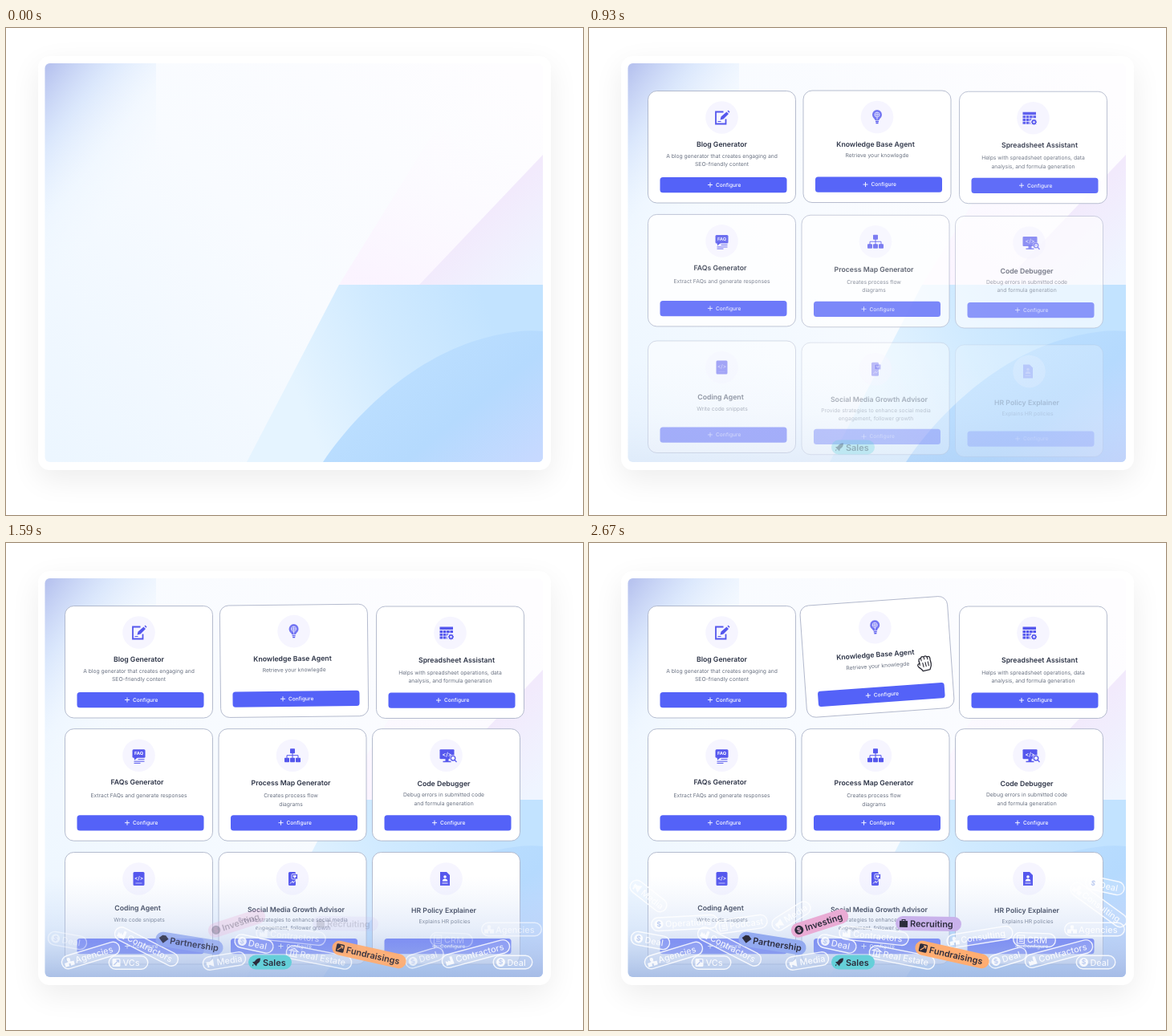
Animation of 719 by 607 pixels, one loop 2.7 s. Source, as an HTML page with a canvas:

```html
<!DOCTYPE html>
<html lang="en">
<head>
<meta charset="utf-8">
<style>
  html, body { margin: 0; width: 100%; height: 100%; overflow: hidden; background: #fff; }
  canvas { display: block; width: 719px; height: 607px; }
</style>
</head>
<body>
<canvas id="stage" width="719" height="607"></canvas>
<script>
const ctx = document.getElementById('stage').getContext('2d');
ctx.textRendering = 'geometricPrecision';
const LOOP = 2700, ACCENT = '#5462f8', ICON = '#5557ed';

const clamp = v => Math.max(0, Math.min(1, v));
const progress = (t, start, length) => clamp((t - start) / length);
const easeOut = u => 1 - (1 - u) ** 1.6;
const smooth = u => (1 - Math.cos(Math.PI * u)) / 2;

function box(x, y, w, h, r, fill, stroke, width = 1) {
  ctx.beginPath();
  ctx.roundRect(x, y, w, h, r);
  if (fill) { ctx.fillStyle = fill; ctx.fill(); }
  if (stroke) { ctx.strokeStyle = stroke; ctx.lineWidth = width; ctx.stroke(); }
}
function disc(x, y, r, fill) {
  ctx.beginPath();
  ctx.arc(x, y, r, 0, 7);
  ctx.fillStyle = fill;
  ctx.fill();
}
function text(s, x, y, size, weight, color, align = 'center') {
  ctx.font = `${weight} ${size}px Inter, sans-serif`;
  ctx.textAlign = align;
  ctx.fillStyle = color;
  ctx.fillText(s, x, y + size * 0.35);
}
function fillPath(d, color) {
  ctx.fillStyle = color;
  ctx.fill(new Path2D(d), 'evenodd');
}
function strokePath(d, color, width = 1) {
  ctx.strokeStyle = color;
  ctx.lineWidth = width;
  ctx.stroke(new Path2D(d));
}
function gradient(x0, y0, x1, y1, ...colors) {
  const g = ctx.createLinearGradient(x0, y0, x1, y1);
  colors.forEach((c, i) => g.addColorStop(i / (colors.length - 1), c));
  return g;
}
function at(x, y, degrees, draw) {
  ctx.save();
  ctx.translate(x, y);
  ctx.rotate(degrees * Math.PI / 180);
  draw();
  ctx.restore();
}

const cardIcons = {
  edit() {
    strokePath('M2,-7H-7.5V8H5V2', ICON, 1.8);
    fillPath('M-2,3L-1,-1L6,-7L8.5,-4.5L2,2ZM7,-8L8,-9L10,-7L9,-5.8Z', ICON);
    strokePath('M-5,5H-1', ICON, 1);
  },
  bulb() {
    fillPath('M-2.5,4C-2.5,2-6,1-6,-3A6,6 0 0 1 6,-3C6,1 2.5,2 2.5,4Z', '#7476f2');
    strokePath('M-2,5.5H2M-1.5,7.5H1.5', ICON, 1.4);
    strokePath('M-3,-3A3,3 0 1 1 3,-3A3,3 0 1 1-3,-3M0,-6V3M-3,-3H3', '#f3f2ff', 0.8);
  },
  table() {
    at(-4.5, 0, 0, () => {
      fillPath('M-8.5,-7.5H8V-4H-8.5Z', ICON);
      for (let i = 0; i < 11; i++) box(-8.5 + i % 4 * 4.3, -3 + (i >> 2) * 3.7, 3.6, 3, 0, ICON);
      disc(5.5, 5, 5, '#f6f5ff');
      strokePath('M5.5,1.5V8.5M2,5H9M3,2.5L8,7.5M8,2.5L3,7.5', ICON, 1.4);
      disc(5.5, 5, 2.7, ICON);
      disc(5.5, 5, 1.3, '#f6f5ff');
    });
  },
  faq() {
    box(-8, -7.5, 16, 10.5, 1.5, ICON);
    fillPath('M-6,2H-1L-5.5,6Z', ICON);
    text('FAQ', 0, -2.2, 5.6, 700, '#fff');
    strokePath('M-1,5H7M-6,7.5H7M-6,9.7H2', ICON, 1);
  },
  tree() {
    box(-3, -8.5, 6, 6, 0.8, ICON);
    strokePath('M0,-3V4M-7,4V0H7V4', ICON, 1);
    for (const x of [-7, 0, 7]) box(x - 3, 3, 6, 5.5, 0.8, ICON);
  },
  monitor() {
    at(2, 0, 0, () => {
      box(-10, -7.5, 18, 12, 1, ICON);
      fillPath('M-3,4H1V7H4V8.5H-6V7H-3Z', ICON);
      text('</>', -1, -1.5, 7, 600, '#fff');
      disc(6.5, 3.5, 4, '#f6f5ff');
      strokePath('M3.7,3.5A2.8,2.8 0 1 1 9.3,3.5A2.8,2.8 0 1 1 3.7,3.5M8.5,5.5L11,8.5', ICON, 1.3);
    });
  },
  code() {
    box(-7, -8.5, 14, 17, 1.5, ICON);
    text('</>', 0, -1, 6.5, 600, '#fff');
    strokePath('M-4,5.5H4', '#b9baff', 1);
  },
  phone() {
    box(-5, -8.5, 9, 17, 1.5, ICON);
    box(-1, -6, 7.5, 6.5, 1, ICON, '#f6f5ff', 0.8);
    fillPath('M2.7,-0.8L0.6,-3A1.2,1.2 0 0 1 2.7,-4A1.2,1.2 0 0 1 4.8,-3Z', '#fff');
    strokePath('M-3,6L0,3L1,5L5,1', '#fff', 1);
  },
  profile() {
    fillPath('M-6,-8.5H2L6,-4.5V8.5H-6Z', ICON);
    disc(0, -2.5, 1.8, '#fff');
    fillPath('M-3.3,3C-3.3,-1 3.3,-1 3.3,3Z', '#fff');
    strokePath('M-3.5,5.5H3.5', '#fff', 0.9);
  }
};

// x, y, icon, [title, dx, y], [first line y, dx, lines]
const cards = [
  [73.5, 78.5, 'edit', ['Blog Generator', 0, 66], [81, 0, 'A blog generator that creates engaging and', 'SEO-friendly content']],
  [267, 78, 'bulb', ['Knowledge Base Agent', -2, 67], [81, 0, 'Retrieve your knowlegde']],
  [461.5, 79, 'table', ['Spreadsheet Assistant', 8, 67], [82.5, 0, 'Helps with spreadsheet operations, data', 'analysis, and formula generation']],
  [73.5, 231.7, 'faq', ['FAQs Generator', -2, 66.5], [83, 0, 'Extract FAQs and generate responses']],
  [265, 231.7, 'tree', ['Process Map Generator', -2, 67.5], [83, -2, 'Creates process flow', 'diagrams']],
  [456.5, 231.7, 'monitor', ['Code Debugger', -3, 68], [82, -3, 'Debug errors in submitted code', 'and formula generation']],
  [73.5, 385.5, 'code', ['Coding Agent', -1.5, 69.5], [84.5, 0.5, 'Write code snippets']],
  [265, 385.5, 'phone', ['Social Media Growth Advisor', 4.5, 71], [84, 0.5, 'Provide strategies to enhance social media', 'engagement, follower growth']],
  [456.5, 385.5, 'profile', ['HR Policy Explainer', -3, 72.5], [86, -2, 'Explains HR policies']]
];

function drawCard([x, y, icon, [title, titleDx, titleY], [lineY, lineDx, ...lines]], i, t) {
  const u = progress(t, 110 + 88 * i, 800);
  if (!u) return;
  const tilt = i === 1 ? smooth(progress(t, 1500, 390)) - 0.16 * smooth(progress(t, 1890, 390)) : 0;
  const drop = 14 * (1 - u) ** 2.5 - 7 * tilt;
  ctx.globalAlpha = easeOut(u);
  at(x + 92, y + 70 + drop, -4.8 * tilt, () => {
    ctx.translate(0, -70);
    box(-92, 0, 184, 139.5, 11, '#fff', '#a3abc2', 0.8);
    disc(0, 33, 20.3, '#f6f5ff');
    at(icon === 'profile' ? -1.5 : 0, 33, 0, cardIcons[icon]);
    text(title, titleDx, titleY, 8.7, 600, '#2b3245');
    lines.forEach((line, n) => text(line, lineDx, lineY + n * 10.6, 6.75, 400, '#687080'));
    box(-77, 107.5, 158, 19.3, 3.5, ACCENT);
    strokePath('M-17.5,117H-11.5M-14.5,114V120', '#fff', 0.9);
    text('Configure', -7.5, 117, 6.6, 500, '#fff', 'left');
  });
  ctx.globalAlpha = 1;
}

const pillIcons = {
  coin(c, hole) { disc(0, 0, 5.5, c); text('$', 0, 0, 8.5, 700, hole); },
  rocket(c) { fillPath('M5,-5C1,-5-1,-3-2,-1L-5,0L-3,2L-2,3L0,5L1,2C3,1 5,-1 5,-5ZM-3,3L-5,5L-5,3Z', c); },
  bag(c) { fillPath('M-5,-3H-2.5V-5H2.5V-3H5V5H-5ZM-1.3,-3H1.3V-4H-1.3Z', c); },
  gem(c) { fillPath('M-6,-1L-2,-5H2L6,-1L0,5Z', c); },
  chart(c, hole) { box(-5, -5, 10, 10, 1.5, c); strokePath('M-3,3L3,-3M0,-3H3V0', hole, 1.3); },
  people(c) { disc(0, -3, 2.3, c); fillPath('M-6,5V0H-2V-1H2V0H6V5H1V2H-1V5Z', c); },
  factory(c) { fillPath('M-5,5V-1L-2,1V-1L1,1V-5H4L5,5Z', c); },
  bank(c) { strokePath('M-5,-2L0,-5L5,-2ZM-3.5,-1V4M0,-1V4M3.5,-1V4M-5,5H5', c, 1.3); },
  horn(c) { fillPath('M-5,-2H-1L4,-5V5L-1,2H-2V5H-4V2H-5Z', c); },
  form(c) { strokePath('M-4.5,-5H4.5V5H-4.5ZM-2,-2H3M-2,0H3M-2,2.5H3', c, 1.2); }
};

// label, icon, x, y, width, degrees, colour; listed in order of appearance
const pills = [
  ['Sales', 'rocket', 329, 522.5, 54, 0, '#65cfd9'],
  ['Agencies', 'people', 105.5, 514, 76, -17],
  ['Deal', 'coin', 631.5, 522.5, 50, 0],
  ['VCs', 'chart', 152.5, 523, 50, 0],
  ['Contractors', 'factory', 585.5, 512, 88, -15],
  ['Contractors', 'factory', 175, 503, 88, 27],
  ['Deal', 'coin', 309, 499.5, 50, 12],
  ['Fundraisings', 'chart', 452.5, 513, 94, 12.5, '#ffad72'],
  ['Media', 'horn', 272, 521, 55, -9],
  ['Real Estate', 'bank', 390, 516.5, 84, 11],
  ['Partnership', 'gem', 228.5, 499, 85, 9, '#93aaf0'],
  ['Deal', 'coin', 521.5, 517, 50, -17],
  ['Agencies', 'people', 630, 481.5, 76, 0],
  ['Contractors', 'factory', 355, 489.5, 88, 6],
  ['Deal', 'coin', 76.5, 495.5, 50, 10],
  ['CRM', 'form', 555, 494.5, 54, 2],
  ['Investing', 'coin', 287.5, 474, 74, -18, '#e9abd4'],
  ['Recruiting', 'bag', 423, 474.5, 82, 1, '#c9b2eb'],
  ['Consulting', 'people', 487, 491, 84, -9],
  ['Consulting', 'people', 635, 451, 84, 36],
  ['Deal', 'coin', 643, 427, 50, 12],
  ['Operations', 'coin', 119, 473.5, 84, -3],
  ['Podcast', 'form', 190, 475, 66, -8],
  ['Media', 'horn', 252, 465, 55, -32],
  ['Media', 'horn', 74, 440, 55, 38]
].map((pill, i) => ({ pill, start: i ? 960 + 10 * i + 1.4 * i * i : 810 }));
pills.sort((a, b) => !!a.pill[6] - !!b.pill[6]);

function drawPill({ pill: [label, icon, x, y, w, degrees, color], start }, t) {
  const ink = color ? '#2c2c3c' : '#fff';
  const left = -w / 2;
  ctx.globalAlpha = easeOut(progress(t, start, 600)) * (color ? 1 : 0.85);
  at(x, y, degrees, () => {
    if (color) box(left, -9, w, 18, 9, color);
    else box(left + 0.7, -8.3, w - 1.4, 16.6, 8.3, 'rgba(255,255,255,.13)', '#fff', 1.4);
    at(left + 10, 0, 0, () => pillIcons[icon](ink, color || '#b3c4ee'));
    text(label, left + 18, 0.3, 10.9, color ? 600 : 500, ink, 'left');
  });
  ctx.globalAlpha = 1;
}

function drawBackdrop() {
  ctx.fillStyle = gradient(60, 541, 620, 44, '#ecf6ff', '#f8fbff', '#fefdff');
  ctx.fillRect(48, 44, 621, 497);
  ctx.fillStyle = gradient(48, 44, 205, 140, 'rgba(178,190,237,.95)', 'rgba(206,221,250,.65)', 'rgba(235,244,255,.25)');
  ctx.save();
  ctx.beginPath();
  ctx.rect(48, 44, 139, 300);
  ctx.clip();
  ctx.fillStyle = gradient(48, 54, 188, 165, 'rgba(180,192,238,.95)', 'rgba(208,224,251,.7)', 'rgba(232,243,255,.35)', 'rgba(240,248,255,0)');
  ctx.fillRect(48, 44, 139, 300);
  ctx.restore();
  fillPath('M415,320L545,110L669,60V320Z', gradient(470, 320, 580, 90, 'rgba(251,243,255,.9)', 'rgba(254,252,255,0)'));
  fillPath('M515,320L669,158V320Z', gradient(592, 239, 660, 310, '#f2eafc', '#eff5ff'));
  fillPath('M415,320H669V541H300Z', gradient(360, 450, 600, 350, '#e5f4ff', '#d0eaff', '#c2e3ff'));
  fillPath('M395,541C450,460 530,400 610,383Q645,375 669,378V541Z',
    gradient(530, 380, 660, 541, '#bcdfff', '#b5dafe', '#c7d9ff'));
}

function drawShade(t) {
  ctx.globalAlpha = progress(t, 850, 420);
  ctx.fillStyle = gradient(0, 415, 0, 541, 'rgba(196,214,246,0)', 'rgba(184,204,240,.32)', 'rgba(160,183,226,.85)');
  ctx.fillRect(48, 415, 621, 126);
  ctx.globalAlpha = 1;
}

function drawHand(t) {
  ctx.globalAlpha = progress(t, 1640, 200);
  at(418, 150, -14, () => {
    ctx.lineJoin = ctx.lineCap = 'round';
    const d = 'M-6,-4Q-6,-8-3,-7Q-2,-10 1,-8Q3,-10 5,-7Q9,-8 8,-3V2Q8,5 5,9H-4Q-5,6-8,3Q-10,-1-6,-1Z';
    fillPath(d, '#fff');
    strokePath(d, '#2b2b35', 1.3);
    strokePath('M-2,-1V4M1.3,-1V4M4.6,-1V4M-6,-4V1M-3,-7V-4M1,-8V-5M5,-7V-4', '#2b2b35', 1.1);
  });
  ctx.globalAlpha = 1;
}

function draw(t) {
  ctx.fillStyle = '#fff';
  ctx.fillRect(0, 0, 719, 607);
  ctx.save();
  ctx.shadowColor = 'rgba(0,0,0,.075)';
  ctx.shadowBlur = 36;
  ctx.shadowOffsetY = 12;
  box(40, 35, 639, 516, 14, '#fff');
  ctx.restore();

  ctx.save();
  ctx.beginPath();
  ctx.roundRect(48.5, 44, 620.5, 497, 6);
  ctx.clip();
  drawBackdrop();
  cards.forEach((card, i) => drawCard(card, i, t));
  drawShade(t);
  pills.forEach(p => drawPill(p, t));
  drawHand(t);
  ctx.restore();
}

const begin = performance.now();
function frame() {
  draw((performance.now() - begin) % LOOP);
  requestAnimationFrame(frame);
}
frame();
</script>
</body>
</html>
```
